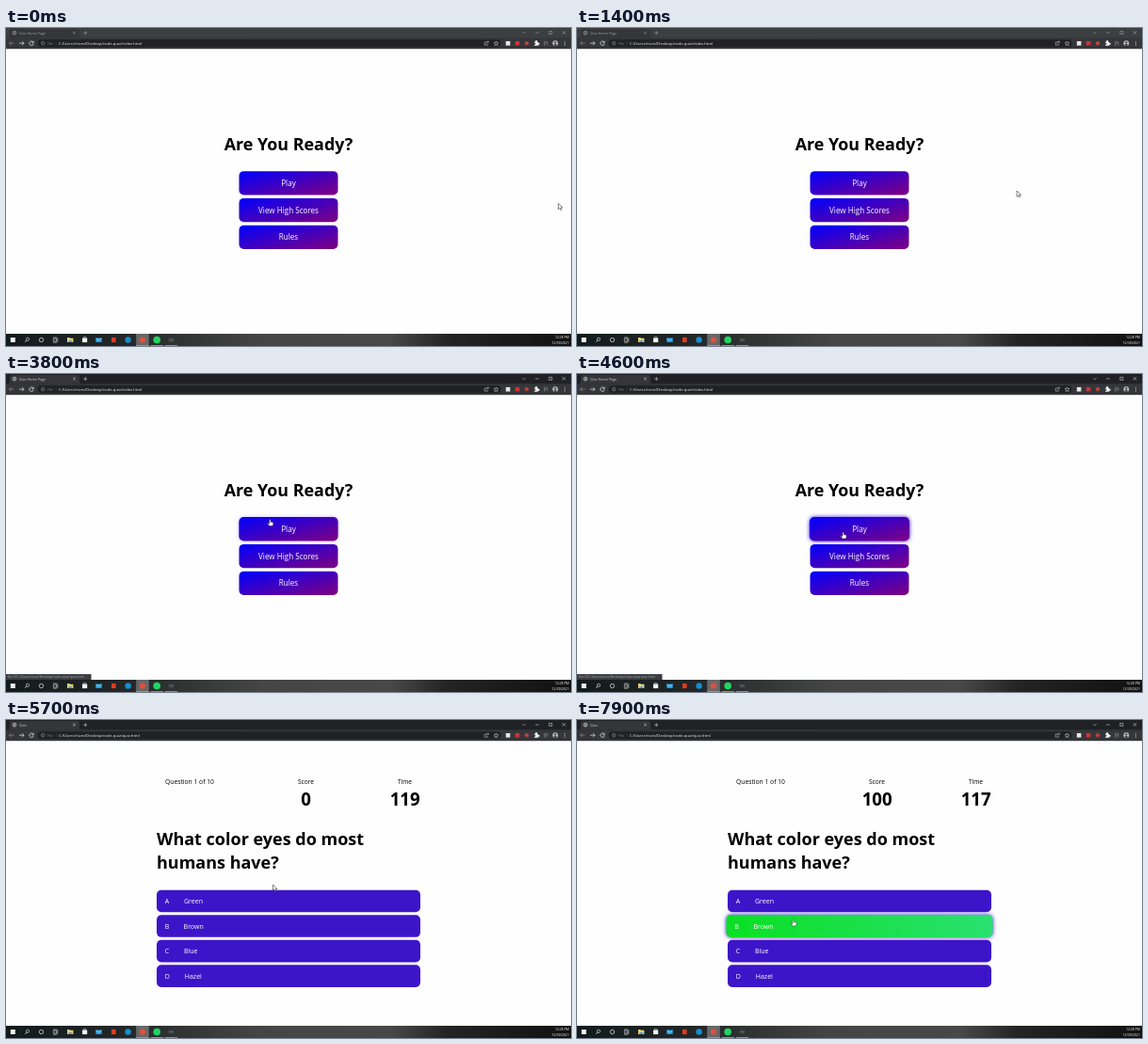
Recreate the animation shown at these times as an HTML page. Size 600 px wide and 338 px high, loop 8000 ms.

```html
<!DOCTYPE html>
<html lang="en">
<head>
<meta charset="utf-8">
<title>Quiz</title>
<style>
  html, body { margin: 0; width: 100%; height: 100%; overflow: hidden; background: #fefefe; }
  svg { display: block; width: 100vw; height: 100vh; }
  text { font-family: "Open Sans", "Noto Sans", sans-serif; white-space: pre; }
  .bold { font-weight: 700; }
</style>
</head>
<body>
<svg id="stage" viewBox="0 0 600 338">
  <defs>
    <linearGradient id="violet" gradientUnits="userSpaceOnUse" x1="-6.7" y1="-24.8" x2="6.7" y2="24.8">
      <stop stop-color="#00f"/><stop offset="1" stop-color="#800080"/>
    </linearGradient>
    <linearGradient id="green" gradientUnits="userSpaceOnUse" x1="-134" y1="20" x2="134" y2="-20">
      <stop stop-color="#0bdf24"/><stop offset="1" stop-color="#29e06f"/>
    </linearGradient>
    <linearGradient id="bar">
      <stop stop-color="#111b1c"/><stop offset=".2" stop-color="#222626"/>
      <stop offset=".45" stop-color="#454545"/><stop offset=".68" stop-color="#484848"/>
      <stop offset=".78" stop-color="#242424"/><stop offset="1" stop-color="#111"/>
    </linearGradient>
    <filter id="blur" x="-20%" y="-60%" width="140%" height="220%"><feGaussianBlur stdDeviation="2"/></filter>
  </defs>
  <rect width="600" height="338" fill="#fefefe"/>
  <g id="home"></g>
  <g id="quiz"></g>
  <g id="browser"></g>
  <g id="taskbar"></g>
  <g id="status"></g>
  <g id="arrow"><path d="M0 0V6.2L1.5 4.9L2.5 7L3.5 6.5L2.6 4.5H4.5Z" fill="#fff" stroke="#222" stroke-width=".55"/></g>
  <g id="hand"><path d="M-.7 .5Q0 -.5 .7 .5V2.6L3 3.2Q3.7 3.5 3.5 4.5L2.9 7H-.8L-2.6 4.3Q-2.5 3.2 -1.5 4L-.7 4.7Z" fill="#fff" stroke="#222" stroke-width=".5"/></g>
</svg>
<script>
const LOOP = 8000, STEP = 100;
const FOCUS = 2800, PAGE = 4800, FIRST_TICK = 5600, ANSWER = 7700;
const FOLDER = 'C:/Users/nivro/Desktop/code-quiz/';

const $ = id => document.getElementById(id);
const text = (x, y, size, str, attrs = '') => `<text x="${x}" y="${y}" font-size="${size}" ${attrs}>${str}</text>`;
const rect = (x, y, w, h, fill, attrs = '') => `<rect x="${x}" y="${y}" width="${w}" height="${h}" fill="${fill}" ${attrs}/>`;
const disc = (x, y, r, fill, attrs = '') => `<circle cx="${x}" cy="${y}" r="${r}" fill="${fill}" ${attrs}/>`;
const line = (d, color, width = .7, attrs = '') => `<path d="${d}" fill="none" stroke="${color}" stroke-width="${width}" ${attrs}/>`;
const middle = 'text-anchor="middle"';

// Buttons are drawn around their own centre so hovering can scale them.
function button(id, cy, w, h, fill, label) {
  const box = (color, attrs) => rect(-w / 2, -h / 2, w, h, color, `rx="5" ${attrs}`);
  return `<g id="${id}" data-y="${cy}" transform="translate(300 ${cy})">
    ${box('#3a12e8', 'class="glow" filter="url(#blur)" opacity="0"')}
    ${box(fill, 'class="face"')}<g fill="#fff">${label}</g></g>`;
}

function setHover(id, amount) {
  const node = $(id);
  node.setAttribute('transform', `translate(300 ${node.dataset.y}) scale(${1 + .011 * amount})`);
  node.querySelector('.glow').setAttribute('opacity', amount);
}

function buildHome() {
  const labels = ['Play', 'View High Scores', 'Rules'];
  $('home').innerHTML = text(300, 129.7, 17.9, 'Are You Ready?', `class="bold" ${middle}`) +
    labels.map((label, i) => button('menu' + i, 164.8 + i * 28.75, 105, 25.3, 'url(#violet)',
      text(0, 3, 8.1, label, middle))).join('');
}

function buildQuiz() {
  const answers = [['Green', 189], ['Brown', 188.6], ['Blue', 189], ['Hazel', 189.8]];
  $('quiz').innerHTML =
    text(195, 68.4, 6.75, 'Question 1 of 10', middle) +
    text(318.5, 68.4, 6.6, 'Score', middle) + text(423.5, 68.4, 6.6, 'Time', middle) +
    text(318.7, 91.2, 18.7, '0', `id="score" class="bold" ${middle}`) +
    text(423.7, 91.2, 18.7, '120', `id="time" class="bold" ${middle}`) +
    text(160, 133.3, 18, 'What color eyes do most', 'class="bold"') +
    text(160, 158.3, 18, 'humans have?', 'class="bold"') +
    answers.map(([answer, x], i) => button('choice' + i, 192.5 + i * 26.55, 280, 23.6, '#3d15c9',
      text(-131.3, 2.5, 7, 'ABCD'[i]) + text(x - 300, 2.5, 7, answer))).join('');
}

function buildBrowser() {
  const pale = '#d5d6d8';
  $('browser').innerHTML =
    rect(0, 0, 600, 11, '#202124', 'id="strip"') +
    rect(0, 10.3, 600, 11.9, '#35363a') +
    '<path d="M2 10.4Q4 10 4 8V3Q4 1 6 1H76Q78 1 78 3V8Q78 10 80 10.4Z" fill="#35363a"/>' +
    '<g id="tab">' + disc(9, 5.2, 1.9, 'none', `stroke="${pale}" stroke-width=".7"`) +
    line('M7.5 4.5L10 6M8.3 6.8L10 3.8', pale, .5) +
    text(14, 6.5, 3.65, '', `id="title" fill="${pale}"`) +
    line('M71.2 3.8l2.6 2.6m0 -2.6l-2.6 2.6M82.3 5.2h4m-2 -2v4', pale, .6) +
    line('M548.5 4.3l1.5 1.5 1.5 -1.5M562.2 5h3.6M576.8 3.4h3v3h-3zM590.7 3.2l3.4 3.4m0 -3.4l-3.4 3.4', pale, .6) + '</g>' +
    line('M8.5 16.2h-5m2 -2l-2 2 2 2', '#8b8d90') +
    line('M14 16.2h5m-2 -2l2 2 -2 2', '#e8eaed') +
    disc(27, 16.2, 4.6, '#5a5c60', 'id="reloadHover"') +
    line('M28.6 14.7A2.2 2.2 0 1 0 29.2 16.6M29.2 13.7v2h-2', '#e8eaed') +
    rect(33.5, 12.2, 492, 8, '#202124', 'rx="4"') +
    disc(39.2, 16.2, 1.8, 'none', 'stroke="#9aa0a6" stroke-width=".55"') +
    line('M39.2 15.8v1.5M39.2 14.8v.5', '#9aa0a6', .5) +
    text(44, 17.7, 3.8, 'File', 'fill="#858a90"') +
    line('M53.2 14.2v4', '#5f6368', .4) +
    text(56, 17.7, 4.2, '', 'id="url" fill="#f1f2f3"') +
    line('M511 15h-2.8v3.2h3.4v-1.4M509.7 16.7l2.6 -2.4m-1.5 0h1.6v1.5', '#b7b9bc', .6) +
    line('M520.5 14l.7 1.6 1.7.1 -1.3 1.2.4 1.7 -1.5 -.9 -1.5.9.4 -1.7 -1.3 -1.2 1.7 -.1z', '#d5d6d8', .55) +
    rect(530.8, 14, 4.6, 4.6, '#e5e7e7') + rect(540.8, 14, 4.6, 4.4, '#d52f38') +
    disc(553, 16.2, 2.1, '#b9423b') +
    '<path d="M561 14.7h1.3a1 1 0 1 1 1.6 0h1.3v1.3a1 1 0 1 1 0 1.6v1.2h-4.2v-1.4a.9.9 0 1 0 0 -1.4z" fill="#f4f4f4"/>' +
    line('M571 14.8h4M571 16.4h2M571 18h2M574.8 15v3', '#aaacae', .55) +
    disc(583.3, 16.2, 2.9, '#b8bbb5') + disc(583.3, 15.4, 1.1, '#45433f') +
    '<path d="M581.2 18.3q2.1 -3.2 4.2 0q-2.1 1.4 -4.2 0z" fill="#45433f"/>' +
    [14.4, 16.2, 18].map(y => disc(593.3, y, .5, '#e8eaed')).join('');
}

function buildTaskbar() {
  const white = '#f2f2f2';
  $('taskbar').innerHTML =
    rect(0, 325, 600, 13, 'url(#bar)') +
    rect(138.2, 325, 13.6, 13, '#686868') +
    [138.2, 153.5, 168.7].map(x => rect(x, 337.1, 13.4, .9, '#b98b93')).join('') +
    rect(4.8, 329, 5, 5, white) +
    disc(23, 330.8, 1.6, 'none', `stroke="${white}" stroke-width=".6"`) + line('M21.9 332l-1.8 1.9', white) +
    disc(37.5, 331.5, 2.2, 'none', `stroke="${white}" stroke-width=".7"`) +
    line('M50.3 330.2h3.2v2.8h-3.2zM50 329h4M50 334.2h4M54.8 329v5', white, .55) +
    '<path d="M65 329h2.3l.8 .8h3.3v4.2H65z" fill="#f4cf69"/>' + rect(66.3, 332, 3.8, 2, '#4ca5dd') +
    rect(81, 329.5, 5.2, 4.6, white) + line('M82.4 329.5v-1.1h2.4v1.1', white, .5) +
    rect(95.3, 329.5, 6.4, 4.4, '#24a4ea') + line('M95.4 329.7l3.1 2.4 3.1 -2.4', '#d8f1ff', .5) +
    rect(112, 328.9, 4.6, 5.2, '#df3d20') +
    disc(129.6, 331.5, 3.2, '#168fce') +
    disc(145, 331.5, 3.1, '#e0503f') +
    disc(160.2, 331.5, 3.8, '#1ed760') +
    rect(172.5, 329.2, 6, 4.6, '#3d4141') + line('M173.3 331.5h4', '#8b9090', .5) +
    text(598, 330.4, 3.5, '12:28 PM', 'fill="#fff" text-anchor="end"') +
    text(598, 336.3, 3.5, '12/30/2021', 'fill="#fff" text-anchor="end"');
  $('status').innerHTML = rect(0, 319, 90.5, 6, '#3b3d40') +
    text(1.5, 323.3, 3.5, 'file:///' + FOLDER + 'quiz.html', 'fill="#a9abad"');
}

// Pointer tip: time, x, y
const path = [
  [0, 586.5, 186.5], [900, 579, 186], [1400, 467, 173], [2000, 60, 27], [2500, 26, 13.5],
  [2900, 26, 13.5], [3600, 278, 141], [4000, 282.7, 168], [5000, 282.7, 168], [5500, 283.5, 175],
  [5900, 283.5, 175], [6500, 240, 189], [6900, 232.3, 193], [7100, 232.3, 193], [7500, 229.7, 212], [LOOP, 229.7, 212]
];

function pointerAt(t) {
  const i = path.findIndex(p => p[0] > t);
  const [t0, x0, y0] = path[i - 1], [t1, x1, y1] = path[i];
  const k = (t - t0) / (t1 - t0), e = k * k * (3 - 2 * k);
  return [x0 + (x1 - x0) * e, y0 + (y1 - y0) * e];
}

const show = (id, on) => $(id).setAttribute('display', on ? 'inline' : 'none');
const inside = ([x, y], cy, w, h) => Math.abs(x - 300) < w / 2 && Math.abs(y - cy) < h / 2;

function hoverAmount(t, cy, w, h) {
  const samples = [0, 50, 100, 150].map(d => inside(pointerAt(Math.max(0, t - d)), cy, w, h));
  return samples.filter(Boolean).length / samples.length;
}

function render(t) {
  const onQuiz = t >= PAGE, focused = t >= FOCUS, answered = t >= ANSWER;
  const tip = pointerAt(t);
  show('home', !onQuiz);
  show('quiz', onQuiz);

  $('strip').setAttribute('fill', focused ? '#202124' : '#3c3f42');
  $('tab').setAttribute('opacity', focused ? 1 : .65);
  $('title').textContent = onQuiz ? 'Quiz' : 'Quiz Home Page';
  $('url').textContent = FOLDER + (onQuiz ? 'quiz.html' : 'index.html');
  show('reloadHover', Math.hypot(tip[0] - 27, tip[1] - 16.2) < 5);

  let pointing = false;
  const hover = (prefix, count, w, h) => {
    for (let i = 0; i < count; i++) {
      const cy = +$(prefix + i).dataset.y;
      setHover(prefix + i, hoverAmount(t, cy, w, h));
      pointing = pointing || inside(tip, cy, w, h);
    }
  };
  if (onQuiz) hover('choice', 4, 280, 23.6);
  else hover('menu', 3, 105, 25.3);
  show('status', !onQuiz && pointing);

  const ticks = Math.max(0, Math.floor((t - FIRST_TICK) / 1000) + 1);
  $('time').textContent = 120 - ticks;
  $('score').textContent = answered ? 100 : 0;
  $('choice1').querySelector('.face').setAttribute('fill', answered ? 'url(#green)' : '#3d15c9');

  show('arrow', !pointing);
  show('hand', pointing);
  $(pointing ? 'hand' : 'arrow').setAttribute('transform', `translate(${tip})`);
}

buildHome();
buildQuiz();
buildBrowser();
buildTaskbar();
const start = performance.now();
function frame() {
  const t = (performance.now() - start) % LOOP;
  render(Math.floor(t / STEP) * STEP);
  requestAnimationFrame(frame);
}
frame();
</script>
</body>
</html>
```
